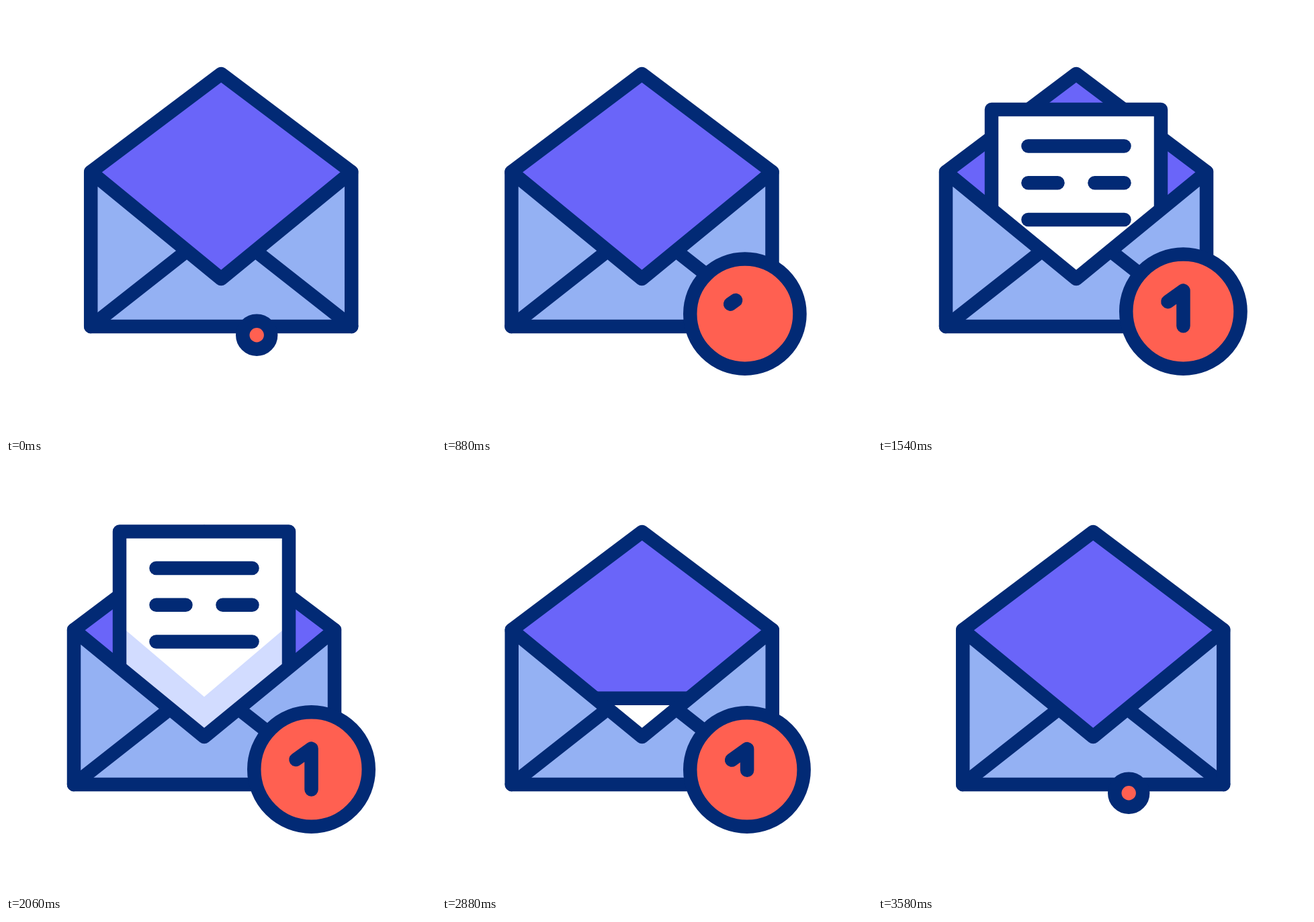
Animation of 640x640 px, one loop 3600 ms. Source, as an HTML page with a canvas:

```html
<!DOCTYPE html>
<html lang="en">
<head>
<meta charset="utf-8">
<title>Mail notification</title>
<style>
  html, body { margin: 0; width: 100%; height: 100%; overflow: hidden; background: #fff; }
  canvas { display: block; width: 100%; height: 100%; }
</style>
</head>
<body>
<canvas id="stage" width="640" height="640"></canvas>
<script>
const ctx = document.getElementById('stage').getContext('2d');
const LOOP = 3600, STEP = 20, TURN = 2200;
const NAVY = '#022a75', PURPLE = '#6a65f9', BLUE = '#94b1f3',
      LAVENDER = '#d2dcff', RED = '#ff6051', WHITE = '#fff';

const clamp = v => Math.min(1, Math.max(0, v));
const easeInOut = u => u < 0.5 ? 4 * u ** 3 : 1 - 4 * (1 - u) ** 3;
const ramp = (t, start, length) => easeInOut(clamp((t - start) / length));

// 0..1: rises in the first part of the loop, falls after the turn
const rise = (t, inStart, inLength, outStart, outLength) =>
  t < TURN ? ramp(t, inStart, inLength) : 1 - ramp(t, outStart, outLength);

function trace(points, close) {
  ctx.beginPath();
  points.forEach(([x, y]) => ctx.lineTo(x, y));
  if (close) ctx.closePath();
}
function fill(points, color) {
  trace(points, true);
  ctx.fillStyle = color;
  ctx.fill();
}
function stroke(points, close) {
  trace(points, close);
  ctx.stroke();
}

const LEFT = [-194, 247], RIGHT = [194, 247], ROOF = [0, 101], NOTCH = [0, 406],
      BOTTOM_LEFT = [-194, 477], BOTTOM_RIGHT = [194, 477];

function drawCard(drop) {
  ctx.save();
  trace([[-194, 0], LEFT, NOTCH, RIGHT, [194, 0]], true);
  ctx.clip();
  ctx.translate(0, drop);
  const sheet = [[-126, 500], [-126, 100.5], [126, 100.5], [126, 500]];
  fill(sheet, WHITE);
  fill([[-126, 239.5], [0, 346.5], [126, 239.5], [126, 500], [-126, 500]], LAVENDER);
  stroke(sheet);
  for (const y of [155, 264.5]) stroke([[-71.5, y], [71.5, y]]);
  for (const side of [-1, 1]) stroke([[27.5 * side, 209.7], [71.5 * side, 209.7]]);
  ctx.restore();
}

function drawEnvelope(x, drop) {
  ctx.save();
  ctx.translate(x, 0);
  fill([LEFT, ROOF, RIGHT, NOTCH], PURPLE);
  stroke([LEFT, ROOF, RIGHT]);
  drawCard(drop);
  fill([LEFT, NOTCH, RIGHT, BOTTOM_RIGHT, BOTTOM_LEFT], BLUE);
  stroke([BOTTOM_LEFT, [-58, 370]]);
  stroke([BOTTOM_RIGHT, [58, 370]]);
  stroke([LEFT, NOTCH, RIGHT, BOTTOM_RIGHT, BOTTOM_LEFT], true);
  ctx.restore();
}

function drawDigit(part) {
  const start = [431.5, 440], corner = [454.5, 423.5], stem = 61;
  const dx = corner[0] - start[0], dy = corner[1] - start[1];
  const slant = Math.hypot(dx, dy), length = part * (slant + stem);
  const k = Math.min(1, Math.max(0.01, length / slant));
  const points = [start, [start[0] + dx * k, start[1] + dy * k]];
  if (length > slant) points.push([corner[0], corner[1] + length - slant]);
  stroke(points);
}

function drawBadge(shrink, digit) {
  const radius = 95.5 - 64.3 * shrink;
  // the circle rests on its lower left until it gets small
  const lift = Math.max(0, (84 - radius) / 52.8) ** 2;
  const x = 359 + radius - 17 * lift;
  const y = 550 - radius - 29 * lift;
  ctx.beginPath();
  ctx.arc(x, y, radius - 10.25, 0, Math.PI * 2);
  ctx.fillStyle = RED;
  ctx.fill();
  ctx.stroke();
  if (digit <= 0) return;
  ctx.save();
  ctx.translate((x - 454.5) * 0.65, y - 454.5);
  drawDigit(digit);
  ctx.restore();
}

function draw(t) {
  ctx.fillStyle = WHITE;
  ctx.fillRect(0, 0, 640, 640);
  ctx.strokeStyle = NAVY;
  ctx.lineWidth = 20.5;
  ctx.lineCap = ctx.lineJoin = 'round';

  const slide = rise(t, 0, 1240, 2570, 1030);
  const card = rise(t, 420, 1640, TURN, 1277);
  const digit = rise(t, 400, 1595, 2420, 1060);
  const shrink = (t < TURN ? 1 - clamp(t / 2524) : clamp((t - TURN) / 1380)) ** 6.7;

  drawEnvelope(320.2 - 25.2 * slide, 420 * (1 - card));
  drawBadge(t >= 2060 && t < TURN ? 0 : shrink, digit);
}

const origin = performance.now();
function frame() {
  const t = (performance.now() - origin) % LOOP;
  draw(Math.floor(t / STEP) * STEP);
  requestAnimationFrame(frame);
}
frame();
</script>
</body>
</html>
```
